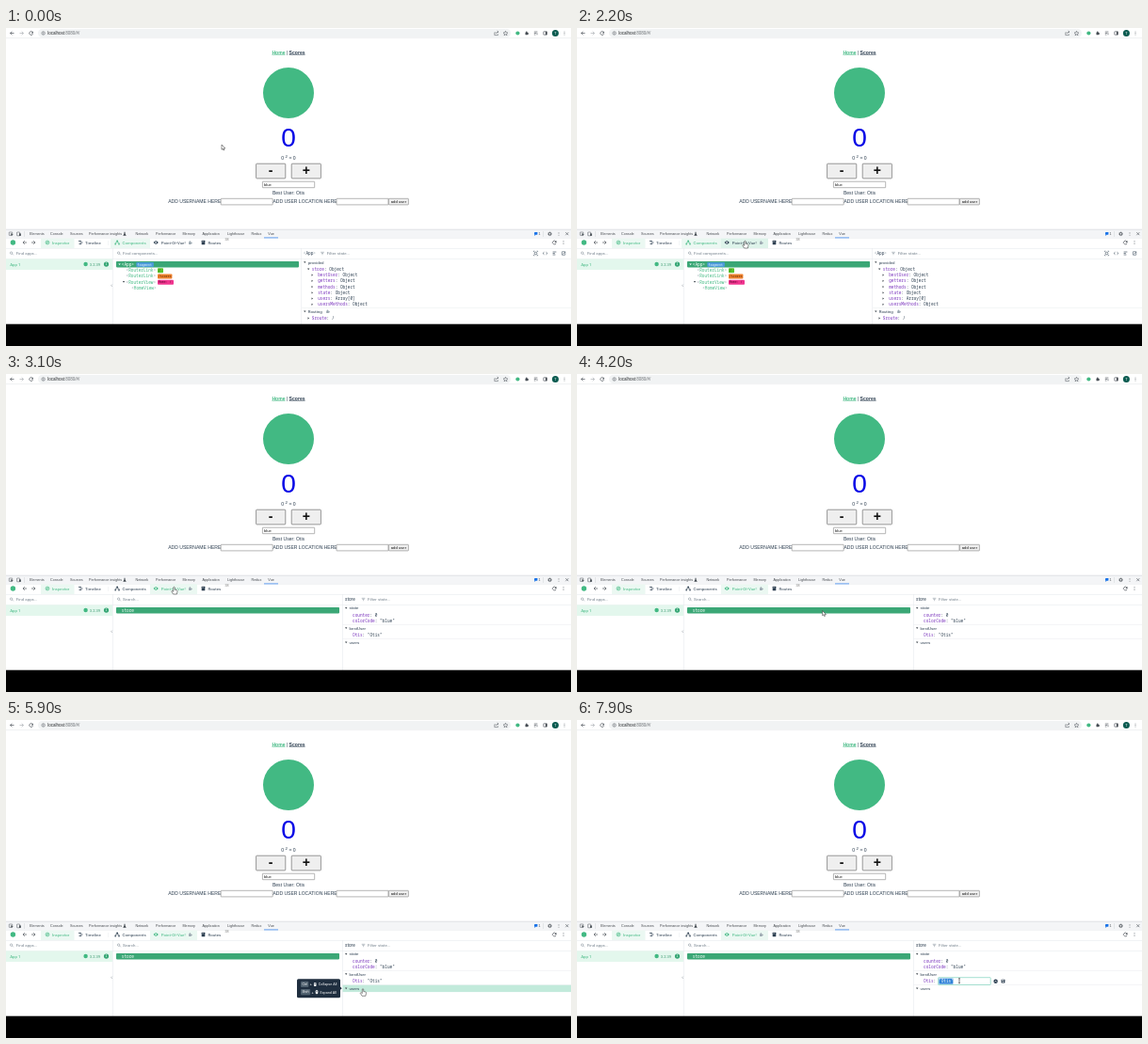
Write an HTML page that moves like this. It is 600 px wide and 338 px high and loops after 8 s.

```html
<!DOCTYPE html>
<html lang="en">
<head>
<meta charset="utf-8">
<title>Counter app with devtools</title>
<style>
html, body { margin: 0; width: 100%; height: 100%; overflow: hidden; background: #fff; }
svg { display: block; width: 100vw; height: 100vh; }
text { white-space: pre; font-family: "Liberation Sans", Arial, sans-serif; }
.ui { font-family: Roboto, sans-serif; }
.mono { font-family: "Noto Sans Mono", "DejaVu Sans Mono", monospace; }
.b { font-weight: bold; }
.mid { text-anchor: middle; }
</style>
</head>
<body>
<svg id="stage" viewBox="0 0 600 338" preserveAspectRatio="none"></svg>
<script>
const INK = '#2c3e50', GREEN = '#42b983', GREY = '#74808c', DARK = '#444b52',
  PURPLE = '#7b35bd', LINE = '#e3e7ea', BAR = '#3ba776';

// ---- drawing helpers ----
const text = (x, y, s, size, fill = INK, cls = '') =>
  `<text x="${x}" y="${y}" font-size="${size}" fill="${fill}" class="${cls}">${s}</text>`;
const ui = (x, y, s, fill = INK, size = 4.4) => text(x, y, s, size, fill, 'ui');
const mono = (x, y, s, fill = INK, size = 4.4) => text(x, y, s, size, fill, 'mono');
const span = (s, fill) => `<tspan fill="${fill}">${s}</tspan>`;
const rect = (x, y, w, h, fill, r = 0, more = '') =>
  `<rect x="${x}" y="${y}" width="${w}" height="${h}" fill="${fill}" rx="${r}" ${more}/>`;
const dot = (x, y, r, fill) => `<circle cx="${x}" cy="${y}" r="${r}" fill="${fill}"/>`;
const ring = (x, y, r, c, w = .6) =>
  `<circle cx="${x}" cy="${y}" r="${r}" fill="none" stroke="${c}" stroke-width="${w}"/>`;
const line = (d, c = DARK, w = .6) => `<path d="${d}" fill="none" stroke="${c}" stroke-width="${w}"/>`;
const shape = (d, c, more = '') => `<path d="${d}" fill="${c}" ${more}/>`;
const group = (id, s) => `<g id="${id}">${s}</g>`;
const at = (x, y, s) => `<g transform="translate(${x} ${y})">${s}</g>`;

// ---- icons, centred on x, y ----
const lens = (x, y) => ring(x - .4, y - .4, 1.2, GREY, .5) + line(`M${x + .5} ${y + .5}l1.3 1.3`, GREY, .5);
const arrow = (x, y, d, c = DARK) =>
  line(`M${x - 2} ${y}h4M${x + d * .2} ${y - 1.8}l${d * 1.8} 1.8l${-d * 1.8} 1.8`, c, .65);
const dots = (x, y, c = DARK) => [-1.5, 0, 1.5].map(d => dot(x, y + d, .42, c)).join('');
const reload = (x, y) => line(`M${x + 1.5} ${y - 1.1}A1.9 1.9 0 1 0 ${x + 1.8} ${y + .6}`, DARK, .65) +
  shape(`M${x + 2.1} ${y - 2.1}v2.1h-2.1z`, DARK);
const puzzle = (x, y, c = GREY) => rect(x - 1.5, y - .9, 2.6, 2.6, c, .3) +
  dot(x - .2, y - 1.2, .75, c) + dot(x + 1.4, y + .4, .75, c);
const gear = (x, y, c = DARK) => ring(x, y, 1.3, c, .9) +
  `<circle cx="${x}" cy="${y}" r="1.9" fill="none" stroke="${c}" stroke-width=".6" stroke-dasharray=".75"/>`;
const down = (x, y, c = DARK) => shape(`M${x - 1.2} ${y - .8}h2.4l-1.2 1.7z`, c);
const right = (x, y, c = DARK) => shape(`M${x - .7} ${y - 1.2}v2.4l1.6-1.2z`, c);
const filter = (x, y) => line(`M${x - 1.8} ${y - 1.2}h3.6M${x - 1.1} ${y}h2.2M${x - .5} ${y + 1.2}h1`, GREY, .5);

function browser() {
  return rect(0, 0, 600, 10.8, '#fff') + rect(34, 1, 502, 9, '#f1f3f4', 4.5) +
    rect(0, 10.6, 600, .5, '#dfe1e4') +
    arrow(6.5, 5.5, -1) + arrow(16.5, 5.5, 1, '#a8acb0') + reload(26.7, 5.5) +
    ring(39.6, 5.5, 1.7, DARK, .5) + line('M39.6 5.2v1.3M39.6 4.3v.5', DARK, .5) +
    text(44.2, 7.2, 'localhost' + span(':8080/#/', '#6c7074'), 4.5, '#25282b') +
    line('M519.8 4.8h-1v2.8h3.6v-1.2M520.4 6q.2-1.9 2.3-1.9m-1-1.2l1.3 1.2l-1.3 1.2', DARK, .5) +
    shape('M530.5 3.2l.7 1.6 1.7.2-1.3 1.1.4 1.7-1.5-.9-1.5.9.4-1.7-1.3-1.1 1.7-.2z', 'none',
      `stroke="${DARK}" stroke-width=".5"`) +
    dot(543.4, 5.5, 2.1, GREEN) + puzzle(553, 5.5, DARK) +
    line('M560.8 4h3.6M560.8 5.5h2.4M560.8 7h1.6M564 5.3v2', DARK, .6) +
    rect(570.8, 3.8, 3.6, 3.4, 'none', .3, `stroke="${DARK}" stroke-width=".6"`) + rect(572.9, 3.8, 1.5, 3.4, DARK) +
    dot(583.4, 5.5, 3.5, '#0b5b50') + text(583.4, 7, 'T', 3.8, '#fff', 'mid') + dots(593, 5.5);
}

function page() {
  const field = x => rect(x, 181.3, 55, 6.6, '#fff', .4, 'stroke="#777" stroke-width=".55"');
  const button = (x, s) => rect(x, 144.2, 31.2, 15.7, '#efefef', .8, 'stroke="#777" stroke-width=".75"') +
    text(x + 15.6, 156.4, s, 14, '#111', 'b mid');
  return text(282.4, 27.6, 'Home', 5.1, GREEN, 'b') + rect(282.4, 28.1, 14.2, .5, GREEN) +
    text(297.9, 27.6, '|', 5.1) +
    text(300.6, 27.6, 'Scores', 5.1, INK, 'b') + rect(300.6, 28.1, 17, .5, INK) +
    dot(300, 69, 27, GREEN) +
    text(300, 126, '0', 28, '#0000e6', 'mid') +
    text(292.2, 139.7, '0', 5.1) + text(296.6, 137.7, '2', 4.4) + text(300.4, 139.7, '= 0', 5.1) +
    button(265.6, '-') + button(303.2, '+') +
    rect(272.4, 163.2, 55.3, 6.5, '#fff', .4, 'stroke="#777" stroke-width=".55"') +
    text(273.9, 168, 'blue', 4.2, '#111') +
    text(300, 177.2, 'Best User: Otis', 5.1, INK, 'mid') +
    text(172.2, 186.3, 'ADD USERNAME HERE', 5.05) + field(228.2) +
    text(283.4, 186.3, 'ADD USER LOCATION HERE', 5.05) + field(351) +
    rect(406.4, 181.3, 21, 6.6, '#efefef', .6, 'stroke="#777" stroke-width=".55"') +
    text(416.9, 186.2, 'add user', 4.2, '#111', 'mid');
}

function toolTabs() {
  const tabs = [[25, 'Elements'], [47, 'Console'], [68, 'Sources'], [88, 'Performance insights'],
    [137.5, 'Network'], [159, 'Performance'], [187.5, 'Memory'], [208.5, 'Application'],
    [235, 'Lighthouse'], [260.5, 'Redux'], [278.3, 'Vue']];
  return rect(0, 214, 600, 9.5, '#f4f5f7') + rect(0, 213.8, 600, .6, '#cdd1d5') +
    rect(0, 223.1, 600, .5, '#d2d6da') + rect(274, 222.6, 15, 1, '#1a73e8') +
    rect(3.3, 217, 3.4, 3.4, 'none', .3, `stroke="${DARK}" stroke-width=".5"`) +
    shape('M4.8 218.2l3 1.1-1.3.5-.5 1.4z', DARK) +
    rect(11.6, 217, 3, 3.8, 'none', .3, `stroke="${DARK}" stroke-width=".5"`) + rect(14, 218.4, 1.8, 2.5, DARK) +
    rect(19.2, 216, .4, 6, '#c8ccd0') +
    tabs.map(([x, s]) => text(x, 220.4, s, 3.74, '#43474c')).join('') +
    shape('M125.5 216.8h1v1.5l1.2 2.4h-3.4l1.2-2.4z', DARK) +
    rect(561, 217, 3.4, 2.7, '#1a73e8', .4) + shape('M561.3 219.4v1.5l1.5-1.5z', '#1a73e8') +
    text(565.6, 220.3, '1', 3.6, DARK) + rect(570.4, 216, .4, 6, '#c8ccd0') +
    gear(577.5, 218.8) + dots(587, 218.8) + line('M594.3 217.2l3 3m0-3l-3 3', DARK, .6);
}

const compass = (x, y, c) => ring(x, y, 1.9, c, .7) + shape(`M${x + 1} ${y - 1}l-.6 1.6-1.4.4.5-1.5z`, c);
const tabTint = c => id => group(id, c);

function compTab(c) {
  return line('M116.2 229.8v-1.8h3.8v1.8M118.1 228v-1.4', c, .6) + rect(117.3, 225.7, 1.7, 1.4, c) +
    rect(115.5, 229.2, 1.4, 1.2, c) + rect(119.3, 229.2, 1.4, 1.2, c) + ui(123.6, 229.7, 'Components', c);
}
function povTab(c) {
  return shape('M156.6 228q2.6-3.6 5.2 0q-2.6 3.6-5.2 0z', c) + dot(159.2, 228, .9, '#fff') +
    dot(159.2, 228, .5, c) + ui(164.8, 229.7, 'Point-Of-Vue!', c);
}

function vueHeader() {
  return rect(0, 223.5, 600, 91.5, '#fff') + rect(37, 223.7, 35.5, 10.3, '#ebf8f2') +
    group('hover', rect(153, 223.7, 50, 10.3, '#def3ea')) +
    group('tint', rect(0, 223.7, 1, 10.3, '#ebf8f2')) +
    rect(0, 234, 600, .5, LINE) + rect(0, 245, 600, .5, LINE) +
    dot(7.4, 228, 2.7, GREEN) + arrow(20, 228, -1) + arrow(29, 228, 1) +
    compass(44, 228, GREEN) + ui(49, 229.7, 'Inspector', GREEN) +
    line('M77 226.4h3M78.4 228h3M77.6 229.6h2.6', INK, .8) + ui(84, 229.7, 'Timeline') +
    rect(108, 226, .4, 5, LINE) +
    group('compOn', compTab(GREEN)) + group('compOff', compTab(INK)) +
    group('povOn', povTab(GREEN)) + group('povOff', povTab(INK)) + puzzle(195.6, 228.2, '#9aa6af') +
    rect(207.7, 225.8, 3.6, 4.4, INK, .5) + rect(208.8, 225.8, .5, 2, '#fff') + ui(214.6, 229.7, 'Routes') +
    text(232.6, 226.3, '38', 3.6, '#777') + reload(582.4, 228) + dots(592, 228);
}

function appList() {
  return lens(6, 239.5) + ui(10.8, 240.9, 'Find apps...', GREY) +
    rect(0, 245.5, 113, 11.5, '#e3f7ed') + ui(4.2, 252.6, 'App 1', GREEN) +
    dot(84.6, 251, 2.2, GREEN) + ui(88.8, 252.5, '3.2.39', '#3a9a70', 4.1) +
    dot(106.5, 251.1, 2.6, '#35a674') + text(106.5, 252.3, '1', 3.4, '#fff', 'mid') +
    rect(113.2, 234, .5, 81, LINE) + line('M112.7 272.6l-.9 1.1.9 1.1', GREY, .5);
}

function compTree() {
  const tag = (x, y, name) => mono(x, y, span('&lt;', '#9aa6af') + name + span('&gt;', '#9aa6af'), GREEN);
  const badge = (x, y, w, c, s, ink) => rect(x, y - 4, w, 5, c, .8) + mono(x + .9, y - .4, s, ink, 3.3);
  return lens(120, 239.5) + ui(124, 240.9, 'Find components...', GREY) +
    rect(117, 248, 194, 6.4, BAR, .8) + down(120.6, 251.2, '#fff') + mono(122.8, 252.7, '&lt;App&gt;', '#fff') +
    badge(138.3, 252.9, 18.6, '#4c9bd8', 'fragment', '#e4f3ff') +
    tag(127.5, 259, 'RouterLink') + badge(161, 259.2, 6, '#57c22d', '/', '#173b08') +
    tag(127.5, 265.3, 'RouterLink') + badge(161, 265.5, 15.4, '#f0822e', '/scores', '#5a2800') +
    down(125, 269.9) + tag(127.5, 271.5, 'RouterView') + badge(161, 271.7, 17, '#f0358f', 'Home: /', '#600733') +
    tag(133.2, 277.7, 'HomeView');
}

function compState() {
  const kids = ['bestUser: Object', 'getters: Object', 'methods: Object', 'state: Object',
    'users: Array[0]', 'usersMethods: Object'];
  const pair = s => s.replace(/^([^:]+)/, m => span(m, PURPLE));
  return rect(313.3, 234, .5, 81, LINE) +
    mono(315.8, 241, span('&lt;', '#9aa6af') + 'App' + span('&gt;', '#9aa6af'), INK) +
    filter(336, 239.5) + ui(340.8, 240.9, 'Filter state...', GREY) +
    ring(562.5, 239.5, 1.3, INK) + line('M560.4 238v-.9h1M564.6 238v-.9h-1M560.4 241v.9h1M564.6 241v.9h-1', INK, .5) +
    line('M571.5 238.2l-1.4 1.3 1.4 1.3M573.5 238.2l1.4 1.3-1.4 1.3', INK) +
    line('M580.6 238h3.8M580.6 239.5h2.2M580.6 241h2.8', INK) +
    rect(590.4, 237.7, 3.4, 3.6, 'none', .3, `stroke="${INK}" stroke-width=".5"`) + line('M591.3 240.5l2.6-2.6', INK) +
    down(317.3, 249) + ui(320.7, 250.5, 'provided') +
    down(321.2, 256.4) + mono(324.8, 257.9, pair('store: Object')) +
    kids.map((s, i) => right(325.2, 262.6 + i * 6.25) + mono(331.2, 264.1 + i * 6.25, pair(s))).join('') +
    rect(314, 297.5, 286, .4, LINE) + down(317.3, 301.4) + ui(320.7, 302.9, 'Routing') + puzzle(341.7, 301.4, '#9aa6af') +
    right(321.2, 308.5) + mono(324.8, 310, pair('$route: /'));
}

function storeTree() {
  return lens(120, 239.5) + ui(124, 240.9, 'Search...', GREY) +
    rect(117, 248, 237, 6.4, BAR, .8) + mono(122.8, 252.7, 'store', '#fff');
}

function storeState() {
  const pair = (y, k, v) => mono(368, y, span(k, PURPLE) + ': ' + v);
  return rect(357, 234, .5, 81, LINE) + ui(360, 240.9, 'store', INK, 4.7) +
    filter(379.5, 239.5) + ui(384, 240.9, 'Filter state...', GREY) +
    group('rowHover', rect(357.5, 281.6, 242.5, 7.5, '#c2eadb')) +
    down(361.2, 248.9) + ui(364.6, 250.4, 'state') +
    pair(258, 'counter', '0') + pair(264.4, 'colorCode', '"blue"') +
    rect(357.5, 266.4, 242.5, .4, LINE) + down(361.2, 270) + ui(364.6, 271.5, 'bestUser') +
    pair(279, 'Otis', '"Otis"') +
    rect(357.5, 281.4, 242.5, .4, LINE) + down(361.2, 285.3) + ui(364.6, 286.8, 'users') +
    group('pencil', shape('M402.2 279.2l.4-1.6 2.4-2.4 1.2 1.2-2.4 2.4z', INK) + mono(410.4, 279, '{', GREY)) +
    group('edit', rect(383.6, 273.7, 55.6, 7.8, '#fff', .5, 'stroke="#7fd3bd" stroke-width=".7"') +
      rect(384.4, 274.7, 15, 5.9, '#2f83d8') + mono(384, 279, '"Otis"', '#fff') +
      dot(444.6, 277.7, 2.2, INK) + line('M443.8 276.9l1.6 1.6m0-1.6l-1.6 1.6', '#fff', .5) +
      rect(450.6, 275.8, 3.8, 3.8, INK, .5) + rect(451.3, 276.3, 2, 1, '#fff') + dot(452.5, 278.5, .6, '#fff'));
}

function tooltip() {
  const mouse = (x, y) => rect(x - 1.3, y - 2.1, 2.6, 4.2, '#fff', 1.2) +
    line(`M${x - 1.3} ${y - .3}h2.6M${x} ${y - 2.1}v1.8`, '#1f2e3f', .4);
  const row = (y, key, w, label) => rect(313, y - 3.2, w, 6.2, '#50616f', 1) +
    text(313 + w / 2, y + 1.2, key, 3.6, '#fff', 'ui mid') +
    ui(313 + w + 1.4, y + 1.3, '+', '#fff', 3.8) + mouse(313 + w + 6.8, y) +
    ui(313 + w + 10.4, y + 1.3, label, '#fff', 3.75);
  return rect(309, 275.2, 46, 20, '#1f2e3f', 1.5) + shape('M355 283.6l1.7 1.6-1.7 1.6z', '#1f2e3f') +
    row(281, 'Ctrl', 8.4, 'Collapse All') + row(289.2, 'Shift', 10.2, 'Expand All');
}

function pointer() {
  const edge = 'stroke="#222" stroke-width=".5" stroke-linejoin="round"';
  return group('cursor',
    group('arrow', shape('M0 0V5.3L1.2 4.2 2 6 2.8 5.7 2.1 4H3.8Z', '#fff', edge)) +
    group('hand', shape('M-.7.5q.7-.9 1.4 0V3l2.1.5q.9.3.7 1.2L2.9 7.8H-.9L-2.8 4.8q.4-.9 1.2-.4l.9.7z', '#fff', edge)) +
    group('beam', line('M-1 -2.6q1 0 1 .6v4q0 .6-1 .6M1 -2.6q-1 0-1 .6M1 2.6q-1 0-1-.6', '#222', .6)));
}

const stage = document.getElementById('stage');
stage.innerHTML = rect(0, 0, 600, 338, '#fff') + browser() + page() + toolTabs() + vueHeader() + appList() +
  group('compTree', compTree()) + group('compState', compState()) +
  group('storeTree', storeTree()) + group('storeState', storeState()) +
  group('tip', tooltip()) + rect(0, 314.7, 600, 23.3, '#000') + pointer();

// ---- motion ----
const LOOP = 8000, STEP = 100;
const path = [[0, 229, 124], [800, 229, 124], [1300, 210, 128], [1400, 210, 128], [2200, 178.5, 226.2],
  [3800, 178.5, 226.2], [4700, 375.5, 287], [5000, 375.5, 287], [5400, 379, 285.5], [6100, 379, 285.5],
  [6500, 390.5, 277], [7100, 390.5, 277], [7500, 406, 277.2], [LOOP, 406, 277.2]];
const el = id => document.getElementById(id);
const show = (id, v) => el(id).setAttribute('opacity', +v);
const ramp = (t, a, b) => Math.min(1, Math.max(0, (t - a) / (b - a)));
const ease = p => p * p * (3 - 2 * p);
const mix = (a, b, p) => a + (b - a) * p;

function place(t) {
  const i = path.findIndex(k => k[0] > t), a = path[i - 1], b = path[i];
  const p = ease(ramp(t, a[0], b[0]));
  return [mix(a[1], b[1], p), mix(a[2], b[2], p)];
}

function draw(t) {
  const [x, y] = place(t);
  const onTab = t >= 2000 && t < 4000, onUsers = t >= 4500 && t < 6300;
  const editing = t >= 7400, picked = t >= 2400, loaded = t >= 2600;
  const hand = onTab || (t >= 4500 && t < 7300);

  el('cursor').setAttribute('transform', `translate(${x} ${y})`);
  show('arrow', !hand && t < 7300);
  show('hand', hand);
  show('beam', t >= 7300);

  const slide = ease(ramp(t, 2300, 2700));
  el('tint').setAttribute('transform',
    `translate(${mix(111, 153, slide)} 0) scale(${mix(42, 50, slide)} 1)`);
  show('hover', onTab);
  show('compOn', !picked);
  show('compOff', picked);
  show('povOn', picked);
  show('povOff', !picked);

  show('compTree', t < 2500);
  show('compState', t < 2500);
  show('storeTree', t >= 2500);
  show('storeState', loaded);

  show('rowHover', onUsers);
  show('tip', ramp(t, 5500, 5800) * (1 - ramp(t, 7200, 7500)));
  show('pencil', t >= 6400 && !editing);
  show('edit', editing);
}

const start = performance.now();
function tick() {
  const t = (performance.now() - start) % LOOP;
  draw(Math.floor(t / STEP) * STEP);
  requestAnimationFrame(tick);
}
tick();
</script>
</body>
</html>
```
